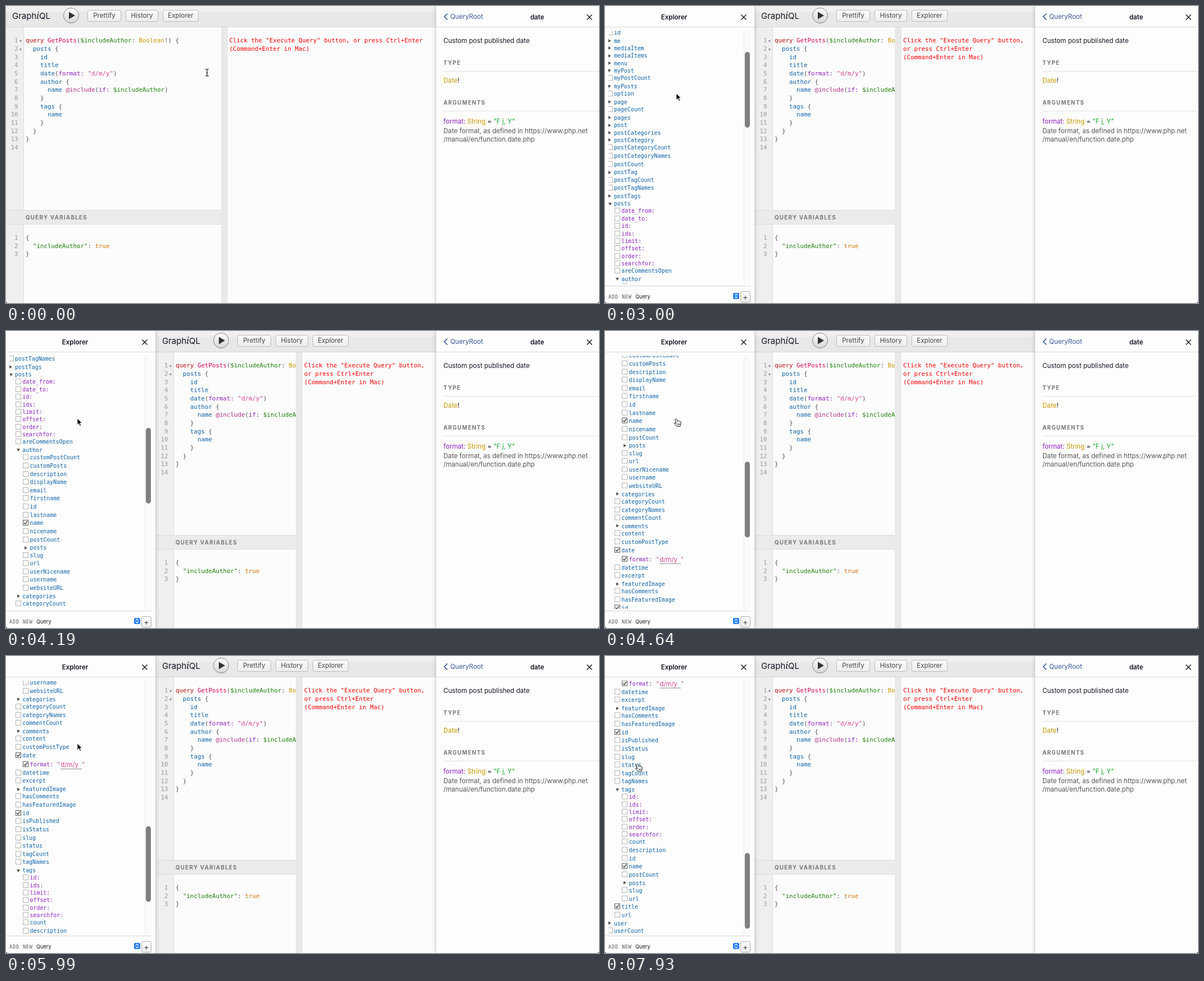
Write an HTML page that moves like this. It is 1056x530 px and loops after 8 s.

```html
<!DOCTYPE html>
<html lang="en">
<head>
<meta charset="utf-8">
<title>GraphiQL explorer</title>
<style>
@property --s { syntax: "<number>"; inherits: true; initial-value: 0; }
* { box-sizing: border-box; }
html, body { margin: 0; width: 100%; height: 100%; overflow: hidden; background: #000; }
body { font: 11.6px/14px Inter, "Open Sans", sans-serif; color: #141823; cursor: default; }
#stage { position: relative; width: 1056px; height: 530px; overflow: hidden; background: #fcfcfc; border-radius: 0 0 4px 4px; }
#stage div, #stage svg { position: absolute; }
svg { overflow: visible; }
pre, .mono { margin: 0; font-family: "DejaVu Sans Mono", "Liberation Mono", monospace; white-space: pre; }
pre { position: absolute; font-size: 10.8px; line-height: 14.65px; color: #555; }
i { font-style: normal; }
.k { color: #b8100a; } .d { color: #d2054e; } .v { color: #1b7f06; } .t { color: #ca9800; }
.f { color: #0e63a9; } .a { color: #8f20bd; } .q { color: #d64292; } .n { color: #b33086; } .b { color: #d47509; }

#main { left: 0; right: 291px; top: 0; bottom: 0; animation: main 8s step-end infinite; }
#top { left: 0; right: 0; top: 0; height: 38px; border-bottom: 1px solid #d8d8d8;
  background: linear-gradient(#f0f0f0 9px, #e8e8e8 12px); }
#logo { left: 11px; top: 9px; font-size: 15px; line-height: 18px; }
#logo i { font: italic 15.5px "Noto Serif", "Liberation Serif", serif; line-height: 1px; }
.btn { top: 7px; height: 21px; border: 1px solid #bdbdbd; border-radius: 3px; line-height: 19px;
  text-align: center; color: #444; background: linear-gradient(#fafafa, #eee); }
#play { left: 102px; top: 3px; width: 28px; height: 28px; border: 1px solid #858585; border-radius: 50%;
  background: linear-gradient(#fdfdfd, #d6d6d8); }
#editor { left: 0; width: 50%; top: 38px; bottom: 0; overflow: hidden; }
#editor pre { top: 17.4px; }
#editor pre.vars { top: 368.9px; }
#result { left: 50%; right: 0; top: 38px; bottom: 0; border-left: 12px solid #e9e9e9; }
#result pre { left: 3px; right: 15px; top: 17.4px; white-space: pre-wrap; color: #f40000; }
.gut { left: 0; width: 32px; background: #efefef; border-right: 1px solid #dadada; }
.num { left: 0; width: 21.5px; text-align: right; color: #999; }
.fold { left: 24px; border: 2.5px solid transparent; border-top: 4px solid #888; border-bottom: 0; }
#vars { left: 0; right: 0; top: 326px; height: 26px; background: #ebebeb; border: solid #dcdcdc; border-width: 1px 0; }
.cap { font-size: 9.8px; font-weight: 700; letter-spacing: 1.25px; color: #777; white-space: nowrap; }
#hbar { left: 33px; top: 318.5px; width: 147px; height: 6px; border-radius: 3px; background: #868686;
  opacity: 0; animation: hbar 8s step-end infinite; }

.panel { top: 0; height: 530px; background: #fdfdfd; box-shadow: 0 0 7px rgba(0,0,0,.18); }
.panel > .head { left: 0; right: 0; top: 0; height: 38px; border-bottom: 1px solid #d9d9d9; }
.head b { position: absolute; top: 12.6px; font-weight: 600; text-align: center; }
.head .x { top: 14.5px; width: 10px; height: 10px; }
#docs { left: 765px; width: 291px; border-left: 1px solid #d0d0d0; }
#docs > p { position: absolute; margin: 0; padding-top: .8px; left: 13px; white-space: nowrap; line-height: 14.4px; }
#docs > p.cap { font-size: 9.8px; right: 0; height: 23px; border-bottom: 1px solid #e0e0e0; }

#explorer { left: 0; width: 267px; border-right: 1px solid #d0d0d0; visibility: hidden;
  animation: show 8s step-end infinite, scroll 8s step-end infinite; }
#view { left: 6px; top: 44px; width: 253px; height: 452px; overflow: hidden; }
#list { left: -6px; top: -44px; width: 260px; transform: translateY(calc(var(--s) * -1px)); }
.row { left: 0; height: 14px; font-size: 9.92px; line-height: 14px; }
.box { top: 1px; width: 10px; height: 10px; border: 1px solid #b2b2b2; background: #fff; }
.box.on { border-color: #555; }
.tri { border: 3.5px solid transparent; }
.tri.shut { top: 3.5px; border-left: 5px solid #555; border-right: 0; }
.tri.open { top: 4.5px; border-top: 5px solid #555; border-bottom: 0; }
.field { height: 15px; border-bottom: 1px solid #888; font-family: Inter, "Open Sans", sans-serif; }
#track { left: 241px; top: 0; width: 13px; height: 452px; border: solid #e8e8e8; border-width: 0 1px;
  background: #fafafa; opacity: 0; animation: track 8s step-end infinite; }
#thumb { left: 246px; top: 2px; width: 6px; height: 135px; border-radius: 5px; background: #7f7f7f;
  transform: translateY(calc(var(--s) * .3305px)); animation: thumb 8s step-end infinite; }
#foot { left: 0; top: 499px; width: 259px; height: 31px; border-top: 1px solid #d6d6d6; }

#cur { left: 0; top: 0; animation: move 8s step-end infinite; }
#cur svg { left: 0; top: 0; width: 1px; height: 1px; opacity: 0; }
#beam { animation: beam 8s step-end infinite; }
#arrow { animation: arrow 8s step-end infinite; }
#hand { animation: hand 8s step-end infinite; }
#stage, #stage * { animation-delay: -4ms; }

@keyframes main { 0% { left: 0; } 20.625%, 100% { left: 267px; } }
@keyframes show { 0% { visibility: hidden; } 20.625%, 100% { visibility: visible; } }
@keyframes hbar { 0% { opacity: 0; } 20.625% { opacity: 1; } 28.125%, 100% { opacity: 0; } }
@keyframes track { 0% { opacity: 0; } 33.75%, 100% { opacity: 1; } }
@keyframes thumb { 0% { left: 246px; width: 6px; } 33.75%, 100% { left: 243px; width: 9px; } }
@keyframes scroll {
  0% { --s: 0; }
  31.875% { --s: 0; animation-timing-function: steps(3); }
  37.5% { --s: 108.9; animation-timing-function: steps(4); }
  44.875% { --s: 312.4; animation-timing-function: steps(2); }
  48.625% { --s: 338; }
  50.5% { --s: 338; animation-timing-function: steps(2); }
  54.25% { --s: 430; animation-timing-function: steps(2); }
  58% { --s: 566.4; animation-timing-function: steps(2); }
  61.75% { --s: 625; animation-timing-function: steps(1); }
  63.625% { --s: 634; }
  67.375% { --s: 634; animation-timing-function: steps(2); }
  71.125% { --s: 735; animation-timing-function: steps(2); }
  74.875% { --s: 779.9; }
  78.625% { --s: 779.9; animation-timing-function: steps(2); }
  82.375% { --s: 880; animation-timing-function: steps(2); }
  86.125% { --s: 908; }
  89.875% { --s: 908; animation-timing-function: steps(5); }
  99.125%, 100% { --s: 924.4; }
}
@keyframes move {
  0% { transform: translate(358px, 119px); }
  3.75% { transform: translate(358px, 119px); animation-timing-function: steps(3); }
  9.375% { transform: translate(322px, 45px); animation-timing-function: steps(2); }
  13.125% { transform: translate(316px, 16px); }
  24.375% { transform: translate(316px, 16px); animation-timing-function: steps(3); }
  30% { transform: translate(127px, 156px); }
  89.875% { transform: translate(127px, 156px); animation-timing-function: steps(5); }
  99.125%, 100% { transform: translate(58px, 192px); }
}
@keyframes beam { 0% { opacity: 1; } 11.25%, 100% { opacity: 0; } }
@keyframes arrow { 0% { opacity: 0; } 11.25% { opacity: 1; } 54.25% { opacity: 0; } 65.5% { opacity: 1; } 95.5%, 100% { opacity: 0; } }
@keyframes hand { 0% { opacity: 0; } 54.25% { opacity: 1; } 65.5% { opacity: 0; } 95.5%, 100% { opacity: 1; } }
</style>
</head>
<body>
<div id="stage">
  <div id="main">
    <div id="editor">
      <div class="gut" style="top:0;height:326px"></div>
      <pre class="num" id="nums"></pre>
      <div class="fold" style="top:23px"></div>
      <div class="fold" style="top:37.5px"></div>
      <pre style="left:35px"><i class="k">query</i> <i class="d">GetPosts</i>(<i class="v">$includeAuthor</i>: <i class="t">Boolean</i>!) {
  <i class="f">posts</i> {
    <i class="f">id</i>
    <i class="f">title</i>
    <i class="f">date</i>(<i class="a">format:</i> <i class="q">"d/m/y"</i>)
    <i class="f">author</i> {
      <i class="f">name</i> <i class="n">@include</i>(<i class="a">if:</i> <i class="v">$includeAuthor</i>)
    }
    <i class="f">tags</i> {
      <i class="f">name</i>
    }
  }
}</pre>
      <div id="hbar"></div>
      <div id="vars"><div class="cap" style="left:35px;top:5.8px">QUERY VARIABLES</div></div>
      <div class="gut" style="top:352px;bottom:0"></div>
      <pre class="num vars">1
2
3</pre>
      <pre class="vars" style="left:35px">{
  <i class="v">"includeAuthor"</i>: <i class="b">true</i>
}</pre>
    </div>
    <div id="result"><pre>Click the "Execute Query" button, or press Ctrl+Enter (Command+Enter in Mac)</pre></div>
    <div id="top">
      <div id="logo">Graph<i>i</i>QL</div>
      <div id="play"><svg style="left:8px;top:6px" width="12" height="14"><path d="M1 .5 12 7 1 13.5z" fill="#333"/></svg></div>
      <div class="btn" style="left:145px;width:60px">Prettify</div>
      <div class="btn" style="left:213px;width:58px">History</div>
      <div class="btn" style="left:279px;width:64px">Explorer</div>
    </div>
  </div>

  <div id="docs" class="panel">
    <div class="head">
      <svg style="left:13px;top:13px" width="8" height="12"><path d="M7 .5 1.5 6 7 11.5" fill="none" stroke="#3b5998" stroke-width="1.7"/></svg>
      <div style="left:25px;top:12px;color:#3b5998">QueryRoot</div>
      <b style="left:140px;width:80px">date</b>
      <svg class="x" style="left:268px"><path d="M.5.5l9 9m0-9l-9 9" stroke="#111" stroke-width="1.4"/></svg>
    </div>
    <p style="top:54.5px">Custom post published date</p>
    <p class="cap" style="top:94px">TYPE</p>
    <p style="top:125.5px"><i class="t">Date</i>!</p>
    <p class="cap" style="top:165px">ARGUMENTS</p>
    <p style="top:198px"><i class="a">format:</i> <i class="t">String</i> = <i style="color:#14a62c">"F j, Y"</i></p>
    <p style="top:215.7px;color:#555">Date format, as defined in https://www.php.net<br>/manual/en/function.date.php</p>
  </div>

  <div id="explorer" class="panel">
    <div class="head">
      <b style="left:83px;width:80px">Explorer</b>
      <svg class="x" style="left:242px"><path d="M.5.5l9 9m0-9l-9 9" stroke="#111" stroke-width="1.4"/></svg>
    </div>
    <div id="view">
      <div id="list">
        <div class="row mono k" style="left:6px;top:46.4px">query</div>
        <div class="field d" style="left:42px;top:45.5px;width:60px;padding-left:1px;font-size:11.3px">GetPosts</div>
      </div>
      <div id="track"></div>
      <div id="thumb"></div>
    </div>
    <div id="foot">
      <div class="mono" style="left:6px;top:12px;font-size:8.6px;letter-spacing:.8px;color:#555">ADD NEW</div>
      <div style="left:54px;top:11.5px;font-size:9.2px">Query</div>
      <svg style="left:228px;top:12px" width="11" height="11"><rect width="11" height="11" rx="2.5" fill="#1f7cf0"/><path d="M3 4.5 5.5 2 8 4.5M3 6.5 5.5 9 8 6.5" fill="none" stroke="#fff" stroke-width="1.2"/></svg>
      <div class="btn" style="left:241px;top:9px;width:18px;height:20px;line-height:18px;font-size:14px;border-color:#b0b0b0">+</div>
    </div>
  </div>

  <div id="cur">
    <svg id="beam"><path d="M-3-6.5Q0-6.5 0-4.5Q0-6.5 3-6.5M0-5V5M-3 6Q0 6 0 4.5Q0 6 3 6M-1.5.5h3" fill="none" stroke="#111" stroke-width="1.1"/></svg>
    <svg id="arrow"><path d="M0 0V11.5L2.7 9 4.7 13.6 6.6 12.8 4.7 8.3H8.2z" fill="#000" stroke="#fff" stroke-width=".8"/></svg>
    <svg id="hand"><path d="M-1.6 1.2Q-.4-.1.7 1.2L2.2 5.2Q3.2 4 4.4 5Q5.6 4.2 6.4 5.5Q8 5 8 7V10Q7.6 12 6.8 14.2H.8Q-1 11.6-3.3 9.2Q-3.9 7.6-2.4 7.8L-.3 9.2-2 3Q-2.2 1.8-1.6 1.2z" fill="#fff" stroke="#111" stroke-width="1"/><path d="M2.3 9.2v2.8M4 9.2v2.8M5.7 9.2v2.8" stroke="#111" stroke-width=".8"/></svg>
  </div>
</div>
<script>
// Marks: > closed branch, < open branch, * ticked, trailing colon = argument.
const args = 'id: ids: limit: offset: order: searchfor:';
const tree = [
  [0, 'customPost customPostCount customPosts >genericCustomPost genericCustomPostCount >genericCustomPosts id >me >mediaItem >mediaItems >menu >myPost myPostCount >myPosts option >page pageCount >pages >post >postCategories >postCategory postCategoryCount postCategoryNames postCount >postTag postTagCount postTagNames >postTags <posts'],
  [1, 'date_from: date_to: ' + args + ' areCommentsOpen <author'],
  [2, 'customPostCount customPosts description displayName email firstname id lastname *name nicename postCount >posts slug url userNicename username websiteURL'],
  [1, '>categories categoryCount categoryNames commentCount >comments content customPostType *date'],
  [2, '*format:'],
  [1, 'datetime excerpt >featuredImage hasComments hasFeaturedImage *id isPublished isStatus slug status tagCount tagNames <tags'],
  [2, args + ' count description id *name postCount >posts slug url'],
  [1, '*title url'],
  [0, '>user userCount']
];
const list = document.getElementById('list');

function add(parent, cls, left, text = '') {
  const el = document.createElement('div');
  el.className = cls;
  el.style.left = left + 'px';
  el.textContent = text;
  parent.append(el);
  return el;
}

function step(word, mark, isArg) {
  if (word === 'date') return 16.3;
  if (word === 'format:') return 14.9;
  return isArg || mark === '>' || mark === '<' ? 13.35 : 14.63;
}

let y = 71.7;
for (const [depth, words] of tree) {
  const x = 15.9 + depth * 13.3;
  for (const item of words.split(' ')) {
    const mark = '><*'.includes(item[0]) ? item[0] : '';
    const word = item.slice(mark.length);
    const isArg = word.endsWith(':');
    const row = add(list, 'row', 0);
    row.style.top = y - 7 + 'px';
    if (mark === '>') add(row, 'tri shut', x - 9.6);
    else if (mark === '<') add(row, 'tri open', x - 10);
    else {
      const box = add(row, mark ? 'box on' : 'box', x - 12.3);
      if (mark) box.innerHTML = '<svg width="8" height="8"><path d="M1.2 4.2 3.2 6.4 7 1.4" fill="none" stroke="#333" stroke-width="1.3"/></svg>';
    }
    add(row, 'mono ' + (isArg ? 'a' : 'f'), x, word);
    if (word === 'format:') {
      add(row, 'mono q', 90.5, '"');
      const input = add(row, 'field q', 96.5, 'd/m/y');
      input.style.cssText += 'width:38px;font-size:11.3px;padding-left:1px';
      add(row, 'mono q', 134.8, '"');
    }
    y += step(word, mark, isArg);
  }
}
document.getElementById('nums').textContent = Array.from({ length: 14 }, (_, i) => i + 1).join('\n');
</script>
</body>
</html>
```
